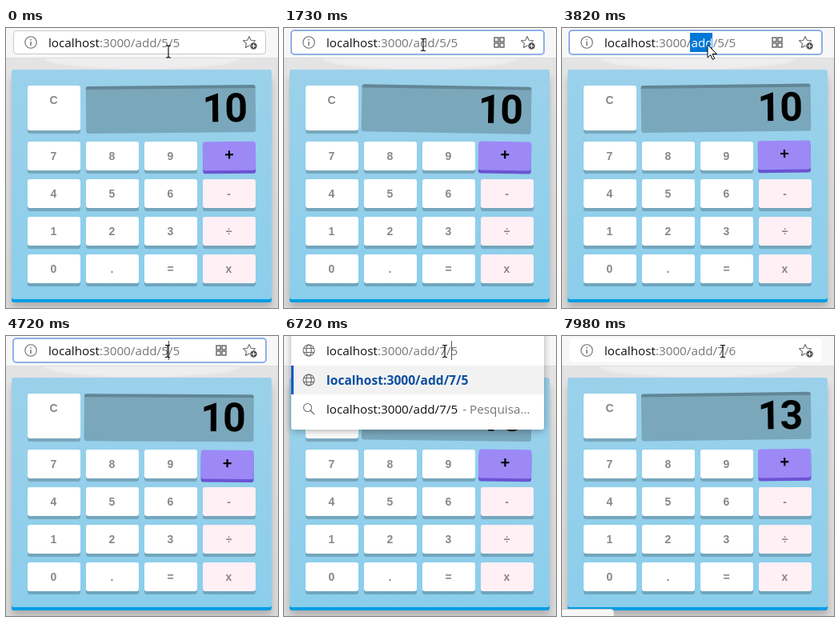
An HTML page that plays this animation: 340x350 px, repeating every 8000 ms.

```html
<!DOCTYPE html>
<html lang="en">
<head>
<meta charset="utf-8">
<title>Calculator</title>
<style>
  html, body { margin: 0; width: 100%; height: 100%; overflow: hidden; background: #e2e2e2; }
  svg { display: block; width: 340px; height: 350px; }
  .ui { font: 15.25px "Open Sans", "Noto Sans", sans-serif; white-space: pre; }
  .key { font: bold 14px "Liberation Sans", Arial, sans-serif; fill: #888; text-anchor: middle; }
  .line { fill: none; stroke: #6a6a6a; stroke-width: 1.1; }
  #value { font: bold 50px Roboto, "Liberation Sans", sans-serif; letter-spacing: -1px; text-anchor: end; }
</style>
</head>
<body>
<svg viewBox="0 0 340 350" xmlns="http://www.w3.org/2000/svg">
  <defs>
    <linearGradient id="body" x2="0" y2="1">
      <stop stop-color="#9bd1ea"/><stop offset="1" stop-color="#8bceec"/>
    </linearGradient>
    <linearGradient id="page" x2="0" y2="1">
      <stop stop-color="#e5e5e5"/><stop offset="1" stop-color="#dadada"/>
    </linearGradient>
    <filter id="soft" x="-20%" y="-20%" width="140%" height="140%"><feGaussianBlur stdDeviation="5"/></filter>
    <filter id="edge"><feGaussianBlur stdDeviation="1"/></filter>
    <g id="globe" class="line">
      <circle r="7"/><ellipse rx="3.2" ry="7"/><path d="M-6.5-2.5H6.5M-6.5 2.5H6.5"/>
    </g>
  </defs>

  <rect width="340" height="350" fill="url(#page)"/>
  <ellipse cx="170" cy="38" rx="122" ry="13" fill="#eee" filter="url(#edge)"/>
  <rect x="7" y="62" width="325" height="287" rx="3" opacity=".2" filter="url(#soft)"/>
  <rect x="7" y="56" width="325" height="287" rx="3" fill="#009de4"/>
  <rect x="7" y="52" width="325" height="287" rx="3" fill="url(#body)"/>
  <g id="keys"></g>
  <g id="screen">
    <rect x="100" y="72" width="212" height="59" rx="3" opacity=".2"/>
    <path d="M100 76V75q0-3 3-3H309q3 0 3 3v1z" opacity=".2"/>
    <text id="value" x="301" y="118"></text>
  </g>
  <g id="plus">
    <rect x="246" y="146" width="66" height="36" rx="3" fill="#6b54d3"/>
    <rect x="246" y="142" width="66" height="36" rx="3" fill="#9c89f6"/>
    <text class="key" x="279" y="165" style="font-size:20px;fill:#000">+</text>
  </g>

  <rect width="340" height="37" fill="#f7f7f7"/>
  <path d="M0 37.5H340" stroke="#dcdcdc"/>

  <g id="bar">
    <rect id="field" x="9.5" y="3.5" width="315" height="29" rx="4" fill="#fff"/>
    <g class="line" transform="translate(31 18)">
      <circle r="7.2"/><path d="M0-1V4M0-4v1.5" stroke-width="1.4"/>
    </g>
    <g id="apps" class="line" transform="translate(269 18)">
      <path d="M-6-6h5v5h-5zM1-6h5v5h-5zM-6 1h5v5h-5zM1 1h5v5h-5z" stroke-width="1.5"/>
    </g>
    <g transform="translate(304 18)">
      <path class="line" d="M0-7.5 2.2-2.7 7.5-2.2 3.6 1.4 4.6 6.6 0 4-4.6 6.6-3.6 1.4-7.5-2.2-2.2-2.7z" stroke-linejoin="round"/>
      <circle cx="5.5" cy="4.5" r="5" fill="#fff"/>
      <circle cx="5.5" cy="4.5" r="4.2" fill="#555"/>
      <path d="M3 4.5h5M5.5 2v5" stroke="#fff"/>
    </g>
  </g>

  <g id="drop">
    <rect x="9" y="-8" width="316" height="127" rx="4" opacity=".3" filter="url(#soft)"/>
    <rect x="9" y="-8" width="316" height="125" rx="3" fill="#fff"/>
    <rect x="9" y="37" width="316" height="36" fill="#f2f2f2"/>
    <rect x="9" y="37" width="3" height="36" fill="#0a5bc0"/>
    <use href="#globe" x="31" y="18"/>
    <use href="#globe" x="31" y="55"/>
    <path class="line" d="M33 93l5 5M34.5 89.5a5 5 0 1 1-10 0a5 5 0 1 1 10 0"/>
    <text id="best" class="ui" x="53" y="61" fill="#0b4fa0" style="font-weight:700;font-size:15.6px"></text>
    <text class="ui" x="53" y="97" fill="#111"><tspan id="query"></tspan><tspan dx="2" fill="#767676"> - Pesquisa...</tspan></text>
  </g>

  <rect id="mark" x="160" y="6" width="28" height="24" fill="#0078d7"/>
  <text id="url" class="ui" x="53" y="24" fill="#767676"></text>
  <path id="caret" d="M0 6V30" stroke="#555"/>
  <path id="arrow" d="M0 0V16L3.7 12.5 6.2 18.3 8.7 17.2 6.2 11.5H11.5z" fill="#fff" stroke="#000" stroke-linejoin="round"/>
  <path id="beam" d="M-3-7.5H-1L0-6.5 1-7.5H3M0-6.5V6.5M-3 7.5H-1L0 6.5 1 7.5H3" fill="none" stroke="#000" stroke-width="1.1"/>
  <path id="status" d="M-1 351V341.5H61q4 0 4 4V351z" fill="#f7f7f7" stroke="#c6c6c6"/>
</svg>

<script>
const $ = id => document.getElementById(id);
const show = (id, on) => $(id).setAttribute("display", on ? "inline" : "none");
const move = (id, x, y) => $(id).setAttribute("transform", `translate(${x} ${y})`);
const LOOP = 8000, HOST = "localhost", BASE = ":3000/";

// Address bar path and caret index inside it
const edits = [
  [0, "add/5/5", -1], [4630, "add/5/5", 5], [5190, "add//5", 4],
  [6180, "add/7/5", 5], [6450, "add/7/5", 6], [6990, "add/7/", 6],
  [7260, "add/7/6", 7], [7620, "add/7/6", -1]
];

// Outline of the address field
const outlines = [[0, "#c9c9c9", 1], [1260, "none", 1], [1730, "#8fb0e8", 2], [7620, "none", 1]];

// Pointer: time, shape, x, y
const pointer = [
  [0, "beam", 203, 29.5], [360, "beam", 203, 28], [720, "beam", 203, 26],
  [900, "", 203, 26], [1730, "beam", 174, 21],
  [2180, "arrow", 174, 20], [3530, "arrow", 178, 21], [3710, "arrow", 182, 21],
  [4450, "arrow", 190, 20], [4630, "beam", 202, 19], [6180, "beam", 201, 19]
];

// Pictures are held: start, count and step of each run
const runs = [[0, 10, 90], [900, 9, 90], [1730, 9, 90], [2540, 10, 90], [3440, 9, 95],
  [4270, 9, 90], [5100, 9, 90], [5910, 9, 90], [6720, 9, 90], [7530, 6, 90]];

// Shake cycle: phase, x, y, degrees
const SHAKE = 119;
const poses = [[0, 0, 0, -0.6], [0.08, -1, -1.3, -0.8], [0.55, -3, 0, 1],
  [0.88, -1, 2.2, -1], [1, 0, 0, -0.6]];

const at = (list, t) => list.findLast(row => row[0] <= t);

function hold(t) {
  const [start, count, step] = at(runs, t);
  return start + step * Math.min(count - 1, Math.floor((t - start) / step + 1e-6));
}

function key(label, col, row) {
  const x = 27 + 73 * col, y = row ? 95 + 47 * row : 72, h = row ? 36 : 56;
  const fill = col === 3 ? "#fff0f5" : "#fff";
  return `<rect x="${x}" y="${y + 4}" width="66" height="${h}" rx="3" opacity=".2"/>
    <rect x="${x}" y="${y}" width="66" height="${h}" rx="3" fill="${fill}"/>
    <text class="key" x="${x + 32.5}" y="${y + 23}">${label}</text>`;
}

$("keys").innerHTML = key("C", 0, 0) + ["789", "456-", "123÷", "0.=x"]
  .map((row, r) => [...row].map((c, i) => key(c, i, r + 1)).join("")).join("");

function shake(t) {
  const u = t / SHAKE % 1;
  const i = poses.findLastIndex(p => p[0] <= u);
  const from = poses[i], to = poses[i + 1];
  const k = (u - from[0]) / (to[0] - from[0]);
  const [, x, y, turn] = from.map((v, n) => v + (to[n] - v) * k);
  const set = (id, cx, cy) =>
    $(id).setAttribute("transform", `translate(${x} ${y}) rotate(${turn} ${cx} ${cy})`);
  set("screen", 206, 101.5);
  set("plus", 279, 160);
}

function outline(t) {
  const [, stroke, width] = at(outlines, t);
  const grow = (width - 1) / 2;
  const attrs = {
    x: 9.5 - grow, y: 3.5 - grow, width: 315 + 2 * grow, height: 29 + 2 * grow,
    stroke, "stroke-width": width
  };
  for (const name in attrs) $("field").setAttribute(name, attrs[name]);
}

function address(t) {
  const [since, path, index] = at(edits, t);
  const focus = t >= 1730 && t < 7620, open = t >= 5190 && t < 7620;
  const marked = t >= 2090 && t < 4630;
  const tail = marked ? `<tspan fill="#fff">add</tspan>${path.slice(3)}` : path;
  $("url").innerHTML = `<tspan fill="#111">${HOST}</tspan>${BASE}${tail}`;
  $("best").textContent = $("query").textContent = HOST + BASE + path;

  show("bar", !open);
  show("drop", open);
  show("apps", focus);
  show("mark", marked);
  const blink = index >= 0 && (t - since) % 1000 < 500;
  show("caret", blink);
  if (blink) {
    const w = $("url").getSubStringLength(0, HOST.length + BASE.length + index);
    move("caret", Math.round(53 + w) + 0.5, 0);
  }
}

function draw(now) {
  const t = hold(now % LOOP);
  shake(t);
  outline(t);
  address(t);
  $("value").textContent = t >= 7800 ? "13" : "10";
  const [, shape, x, y] = at(pointer, t);
  for (const id of ["arrow", "beam"]) {
    show(id, id === shape);
    move(id, x, y);
  }
  show("status", t >= 7980);
}

const begin = performance.now();
function tick() {
  draw(performance.now() - begin);
  requestAnimationFrame(tick);
}
tick();
</script>
</body>
</html>
```
